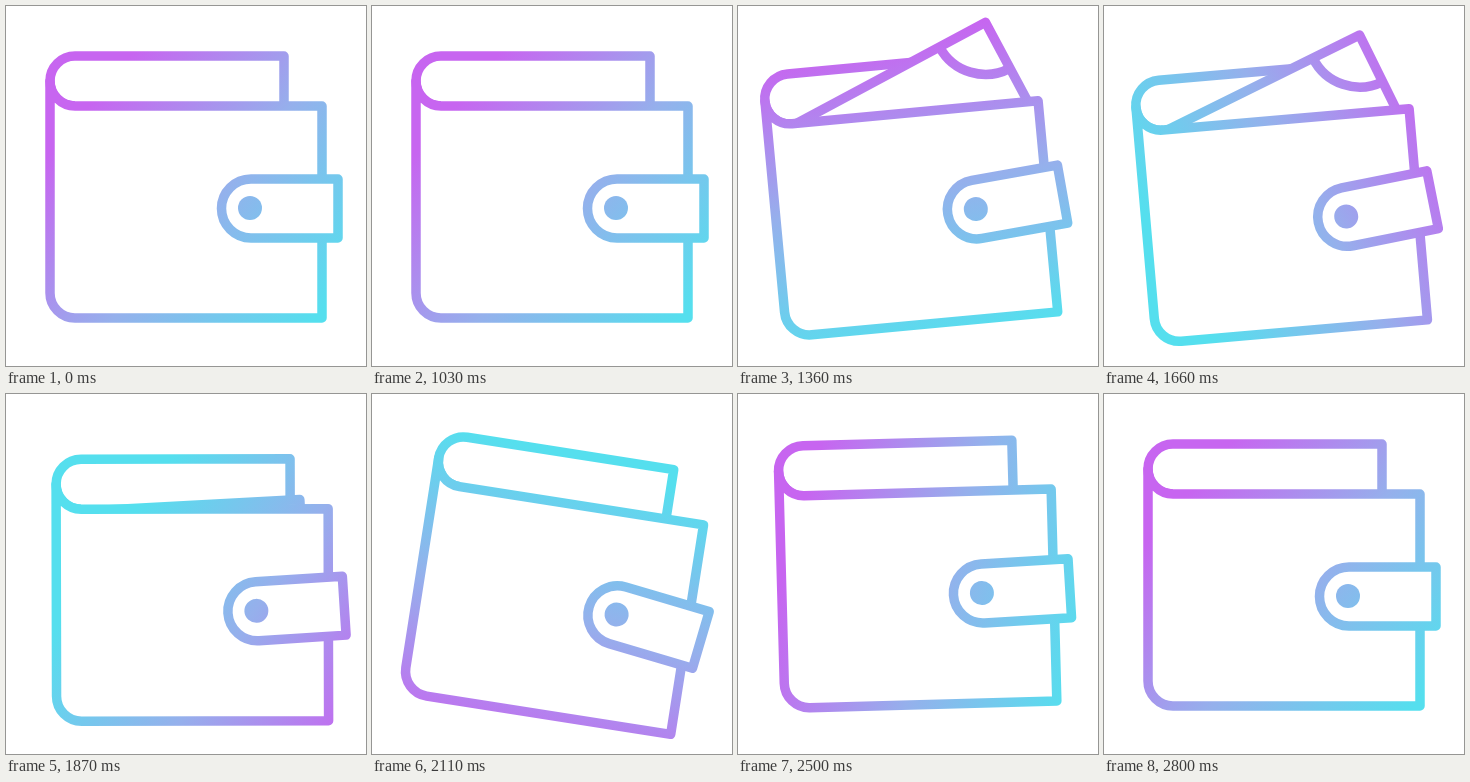
An HTML page with a canvas that plays this animation: 360 px wide and 360 px high, repeating every 2830 ms.

```html
<!DOCTYPE html>
<html lang="en">
<head>
<meta charset="utf-8">
<title>Wallet</title>
<style>
  html, body { margin: 0; height: 100%; overflow: hidden; background: #fff; }
  canvas { display: block; }
</style>
</head>
<body>
<canvas id="stage" width="360" height="360"></canvas>
<script>
const ctx = document.getElementById('stage').getContext('2d');
const LOOP = 2830, REST = 1030, STEP = 30;

const flap = new Path2D('M69 100 A25 25 0 0 1 69 50 H278 V100');
const body = new Path2D('M44 75 A25 25 0 0 0 69 100 H316 V312 H69 A25 25 0 0 1 44 287 Z');
const card = new Path2D('M69 102 H288 V200 H110 Z');
const cardArc = new Path2D('M236 102 A52 52 0 0 0 288 154');
const strap = new Path2D('M332 173 H245 A29.5 29.5 0 0 0 245 232 H332 Z');

const radians = deg => deg * Math.PI / 180;
const progress = (t, from, to) => Math.min(1, Math.max(0, (t - from) / (to - from)));
const smooth = u => u * u * (3 - 2 * u);
// Rises from 0 to 1 and falls back; plateau lingers near the top.
const swell = (t, from, to) => Math.sin(Math.PI * progress(t, from, to)) ** 2;
const plateau = (t, from, to) => 1 - (1 - swell(t, from, to)) ** 2;

// The wallet tips back, sinks, leans forward and settles, in overlapping moves.
function pose(t) {
  const back = plateau(t, REST, 1945);
  const sink = swell(t, 1400, 2400);
  const lean = swell(t, 1820, 2440);
  const settle = swell(t, 2380, 2680);
  return {
    tilt: -5.5 * back + 9 * lean - 1.7 * settle,
    x: -8.1 * back + 7.4 * sink - 0.7 * settle,
    y: 7.3 * back + 14.2 * sink - 1.4 * settle,
    strap: -4.9 * back - 3.6 * sink + 9.9 * lean - 2.1 * settle,
    card: -23.6 * back,
    hue: { x: 200 + 30 * sink, y: 202 + 45 * sink - 22 * back,
           angle: 40 + 360 * smooth(progress(t, 1000, 2780)) }
  };
}

function rotateAt(deg, x, y) {
  ctx.translate(x, y);
  ctx.rotate(radians(deg));
  ctx.translate(-x, -y);
}

function turned(deg, x, y, paint) {
  ctx.save();
  rotateAt(deg, x, y);
  paint();
  ctx.restore();
}

function outline(path) {
  ctx.fill(path);
  ctx.stroke(path);
}

// Black line work takes the gradient; white stays white.
function tint({ x, y, angle }) {
  const dx = 155 * Math.cos(radians(angle)), dy = 155 * Math.sin(radians(angle));
  const g = ctx.createLinearGradient(x - dx, y - dy, x + dx, y + dy);
  ['#c765f0', '#95b0ec', '#55dfee'].forEach((c, i) => g.addColorStop(i / 2, c));
  ctx.globalCompositeOperation = 'screen';
  ctx.fillStyle = g;
  ctx.fillRect(0, 0, 360, 360);
  ctx.globalCompositeOperation = 'source-over';
}

function draw(t) {
  const p = pose(t);
  ctx.fillStyle = '#fff';
  ctx.fillRect(0, 0, 360, 360);
  ctx.strokeStyle = '#000';
  ctx.lineWidth = 9.5;
  ctx.lineJoin = 'round';

  ctx.save();
  ctx.translate(p.x, p.y);
  rotateAt(p.tilt, 180, 181);
  outline(flap);
  turned(p.card, 69, 102, () => {
    outline(card);
    ctx.stroke(cardArc);
  });
  outline(body);
  turned(p.strap, 244, 202, () => {
    outline(strap);
    ctx.fillStyle = '#000';
    ctx.beginPath();
    ctx.arc(244, 202, 12, 0, 7);
    ctx.fill();
  });
  ctx.restore();

  tint(p.hue);
}

const start = performance.now();
function tick() {
  const t = (performance.now() - start) % LOOP;
  draw(t < REST ? 0 : REST + STEP * Math.floor((t - REST) / STEP));
  requestAnimationFrame(tick);
}
tick();
</script>
</body>
</html>
```
